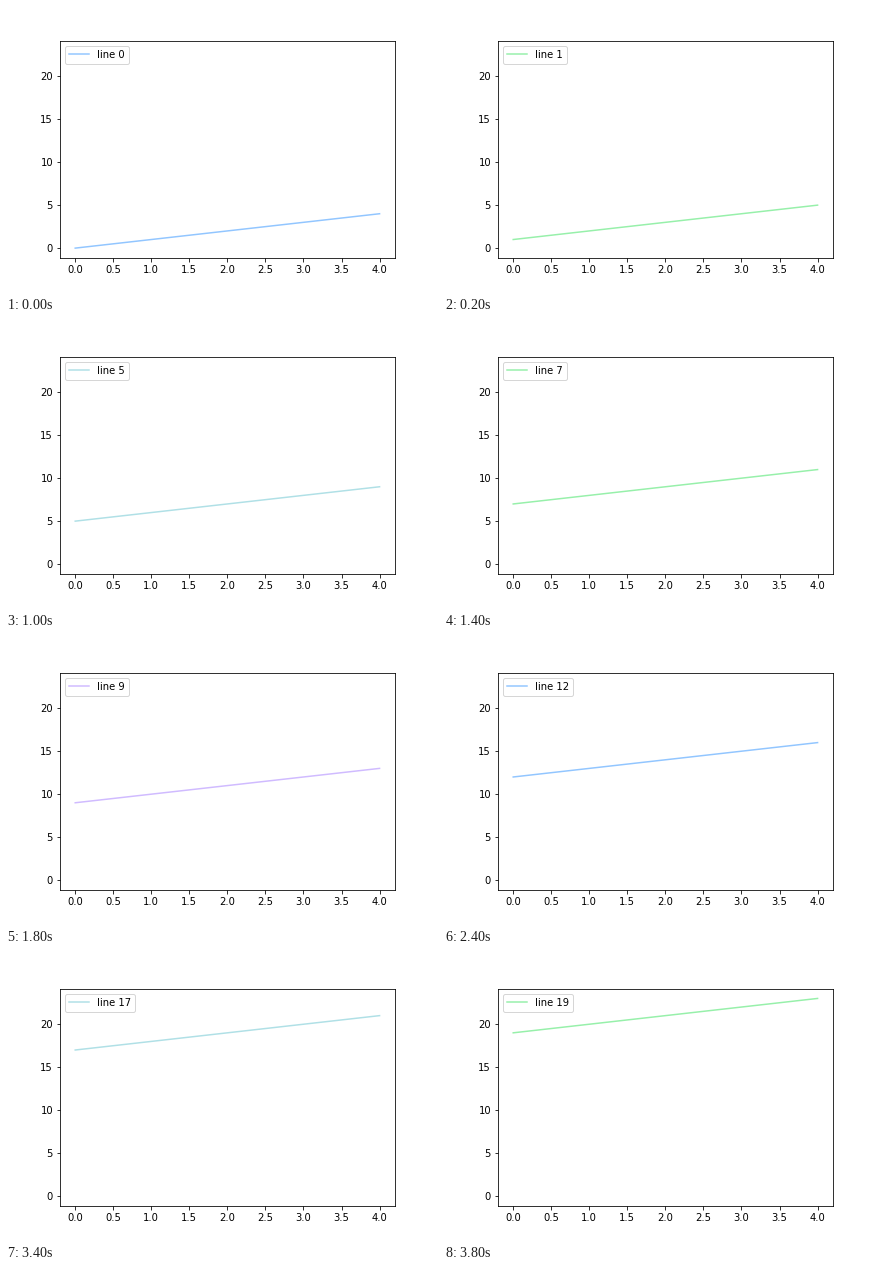
Recreate the animation shown at these times as a matplotlib script. Size 432 by 288 pixels, loop 4000 ms.

```python
import matplotlib.pyplot as plt
import numpy as np
from matplotlib.animation import FuncAnimation

FRAMES = 20
INTERVAL = 200
PASTEL = ["#92C6FF", "#97F0AA", "#FF9F9A", "#D0BBFF", "#FFFEA3", "#B0E0E6"]

plt.rcParams["font.family"] = "DejaVu Sans"
plt.rcParams["font.size"] = 10

fig, ax = plt.subplots(figsize=(6, 4), dpi=72)
fig.subplots_adjust(left=0.125, right=0.9, bottom=0.125, top=0.88)

x = np.arange(5)
line, = ax.plot(x, x, lw=1.5)

# Default 5% margins around the range covered by all the lines
y_max = x[-1] + FRAMES - 1
ax.set_xlim(-0.05 * x[-1], 1.05 * x[-1])
ax.set_ylim(-0.05 * y_max, 1.05 * y_max)


def update(i):
    line.set_ydata(x + i)
    line.set_color(PASTEL[i % len(PASTEL)])
    ax.legend([line], [f"line {i}"], loc="upper left")
    return [line]


anim = FuncAnimation(fig, update, frames=FRAMES, interval=INTERVAL,
                     init_func=lambda: update(0), repeat=True, repeat_delay=0)

plt.show()
```
